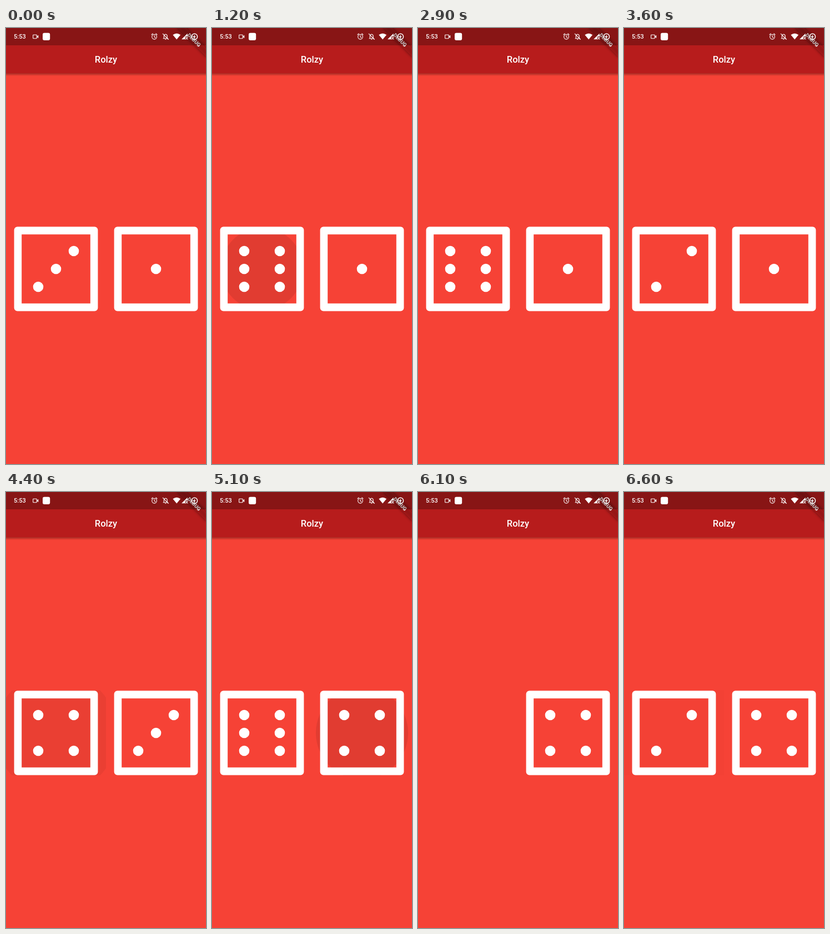
Animation of 360 by 780 pixels, one loop 6.7 s. Source, as an HTML page:

```html
<!DOCTYPE html>
<html lang="en">
<head>
<meta charset="utf-8">
<title>Dice</title>
<style>
  html, body { margin: 0; width: 100%; height: 100%; overflow: hidden; background: #f64236; }
  svg { display: block; width: 100vw; height: 100vh; }
  text { font-family: Roboto, sans-serif; font-weight: 500; fill: #fff; }
</style>
</head>
<body>
<svg viewBox="0 0 360 780">
  <defs>
    <linearGradient id="shade" x2="0" y2="1">
      <stop stop-color="#000" stop-opacity=".32"/>
      <stop offset="1" stop-color="#000" stop-opacity="0"/>
    </linearGradient>
    <filter id="soft" x="-20%" y="-80%" width="140%" height="260%">
      <feGaussianBlur stdDeviation="2.5"/>
    </filter>
    <clipPath id="button"><rect y="355" width="180" height="152"/></clipPath>
  </defs>

  <rect width="360" height="780" fill="#f64236"/>
  <g id="dice"></g>

  <!-- App bar -->
  <rect y="81" width="360" height="5" fill="url(#shade)"/>
  <rect width="360" height="81" fill="#b71c1c"/>
  <text x="180" y="62" font-size="16.5" text-anchor="middle">Rolzy</text>

  <!-- Corner ribbon -->
  <g transform="translate(360 0) rotate(45)">
    <rect x="-37" y="25.2" width="74" height="11" opacity=".5" filter="url(#soft)"/>
    <rect x="-37" y="25.2" width="74" height="11" fill="#b71c1c" fill-opacity=".63"/>
    <text y="33.6" font-size="9.3" text-anchor="middle" style="font-weight:900">DEBUG</text>
  </g>

  <!-- Status bar -->
  <rect width="360" height="31" opacity=".26"/>
  <text x="14" y="19" font-size="11">5:53</text>
  <g fill="none" stroke="#fff" stroke-width="1.1" stroke-linecap="round">
    <rect x="48.7" y="12.3" width="6.6" height="6.4" rx=".8"/>
    <path d="M255.5 0" />
    <g id="alarm">
      <circle cx="267" cy="15.8" r="4.3"/>
      <path d="M267 13.3V16L269 17.2M262 12L264.3 10M272 12L269.7 10"/>
    </g>
    <g id="mutedBell">
      <path d="M284.3 18.5V14.5Q284.3 11.5 287.2 11.2Q290.2 11.5 290.2 14.5V18.5M283 18.7H291.5M286.5 20.3H288M282.3 10.3L292.3 20.5"/>
    </g>
    <circle cx="339.3" cy="15.5" r="5.2" stroke-width="1.5"/>
    <path d="M323.5 16.5L327 20M327 16.5L323.5 20"/>
  </g>
  <g fill="#fff">
    <path d="M55.5 15L58.3 12.8V18.2L55.5 16Z"/>
    <rect x="66" y="8.8" width="13.2" height="13.2" rx="3"/>
    <path d="M300.3 12.2Q307.2 7.2 314.1 12.2L307.2 20.5Z"/>
    <path d="M316 20.3L326.6 9.8V15.3H322.5V20.3Z"/>
    <path d="M340 11.8L336.8 16.2H339L338.5 19.2L341.8 14.8H339.6Z"/>
  </g>
</svg>
<script>
const LOOP = 6700, STEP = 100;
const INK = 0.085, PRESS = 150, HOLD = 60, FADE = 340;

// Each roll: [release time, face]; face 0 has no picture.
const players = [
  { x: 0, start: 3, rolls: [[1200, 6], [3200, 2], [4200, 4], [4700, 6], [5700, 0], [6250, 2]] },
  { x: 180, start: 1, rolls: [[3850, 3], [5050, 4]] }
];

// Each pip: column, row and the faces that show it.
const pips = [
  [0, 0, [4, 5, 6]], [2, 0, [2, 3, 4, 5, 6]],
  [0, 1, [6]], [1, 1, [1, 3, 5]], [2, 1, [6]],
  [0, 2, [2, 3, 4, 5, 6]], [2, 2, [4, 5, 6]]
];

function add(parent, tag, attributes) {
  const node = document.createElementNS("http://www.w3.org/2000/svg", tag);
  for (const key in attributes) node.setAttribute(key, attributes[key]);
  return parent.appendChild(node);
}

const dice = players.map(player => {
  const root = add(document.getElementById("dice"), "g", { transform: `translate(${player.x} 0)` });
  const clip = add(root, "g", { "clip-path": "url(#button)" });
  const ripple = add(clip, "circle", { cx: 90, cy: 431 });
  const body = add(root, "g", { fill: "#fff" });
  add(body, "path", {
    d: "M20.6 355.6H159.4a6 6 0 0 1 6 6V500.4a6 6 0 0 1 -6 6H20.6" +
       "a6 6 0 0 1 -6 -6V361.6a6 6 0 0 1 6 -6ZM28.2 369.2V492.8H151.8V369.2Z",
    "fill-rule": "evenodd"
  });
  const dots = pips.map(([col, row]) =>
    add(body, "circle", { cx: 58 + 32 * col, cy: 399 + 32 * row, r: 9.3 }));
  return { ...player, ripple, body, dots };
});

function inkOpacity(age) {
  if (age < 0) return INK * Math.max(0, 1 + age / PRESS);
  return INK * Math.min(1, Math.max(0, 1 - (age - HOLD) / FADE));
}

function draw(time) {
  for (const die of dice) {
    let face = die.start, opacity = 0, radius = 0;
    for (const [release, value] of die.rolls) {
      const age = time - release, ink = inkOpacity(age);
      if (age >= 0) face = value;
      if (ink > opacity) {
        opacity = ink;
        radius = 74 + 0.18 * age;
      }
    }
    die.ripple.setAttribute("r", radius);
    die.ripple.setAttribute("opacity", opacity);
    die.body.style.display = face ? "" : "none";
    die.dots.forEach((dot, i) => dot.style.display = pips[i][2].includes(face) ? "" : "none");
  }
}

const began = performance.now();
function tick() {
  const time = (performance.now() - began) % LOOP;
  draw(Math.floor(time / STEP) * STEP);
  requestAnimationFrame(tick);
}
tick();
</script>
</body>
</html>
```
